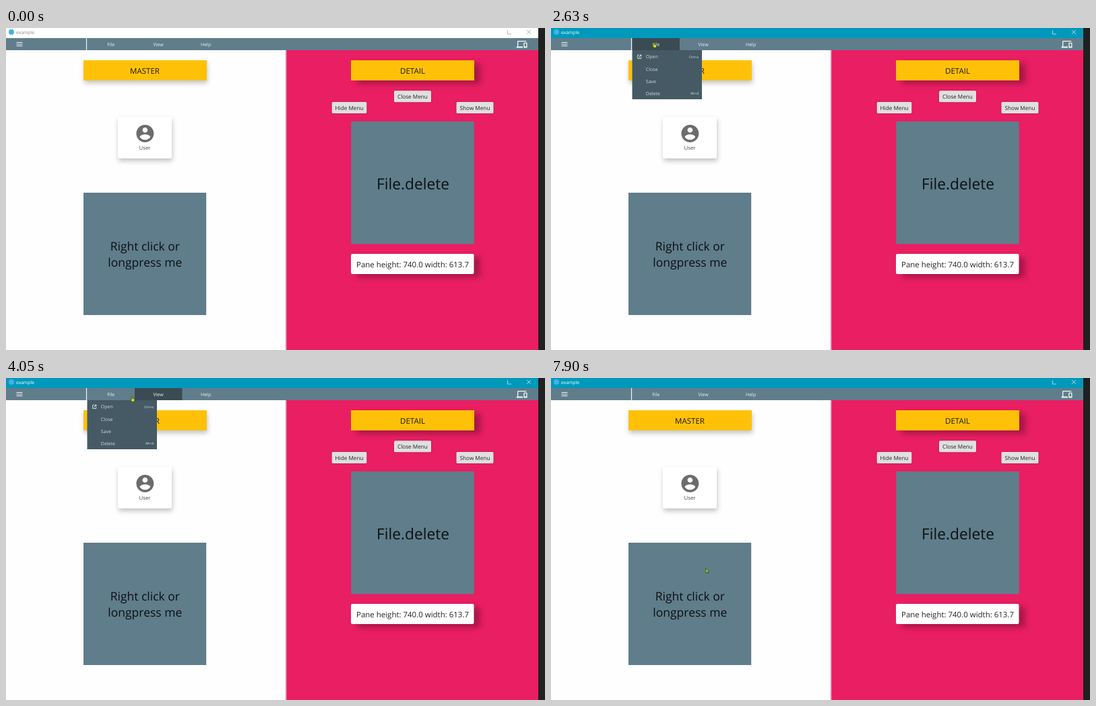
Animation, 800 px wide and 479 px high, one loop 8000 ms. Source, as an HTML page:

```html
<!DOCTYPE html>
<html lang="en">
<head>
<meta charset="utf-8">
<title>example</title>
<style>
  html, body { margin: 0; width: 100%; height: 100%; overflow: hidden; background: #fefefe; }
  svg { display: block; width: 800px; height: 479px; }
  text { font-family: "Open Sans", "Noto Sans", sans-serif; text-rendering: geometricPrecision; }
  .mid { text-anchor: middle; }
  .slate { fill: #607d8b; }
  .amber { fill: #ffc107; }
  .bar { fill: #eef2f3; font-size: 7px; }
  .item { fill: #d0d8dc; font-size: 7px; }
  .hint { fill: #e4e9eb; font-size: 5px; text-anchor: end; }
  .head { fill: #1b1708; font-size: 11.5px; }
  .btn rect { fill: #e0e0e0; }
  .btn text { fill: #222; font-size: 8.2px; }
  .big { fill: #0c1012; }
  .left { filter: drop-shadow(1px 4px 3.5px rgba(0, 0, 0, .23)); }
  .right { filter: drop-shadow(9px 5px 4px rgba(0, 0, 0, .28)); }
  .small { filter: drop-shadow(.5px .8px .8px rgba(0, 0, 0, .22)); }
</style>
</head>
<body>
<svg viewBox="0 0 800 479">
  <defs>
    <linearGradient id="edge">
      <stop offset="0" stop-color="#fefefe"/>
      <stop offset=".5" stop-color="#f3a5c0"/>
      <stop offset="1" stop-color="#e91e63"/>
    </linearGradient>
  </defs>

  <!-- panes -->
  <rect width="415" height="479" fill="#fefefe"/>
  <rect x="416" width="374" height="479" fill="#e91e63"/>
  <rect x="414" y="33" width="3" height="446" fill="url(#edge)"/>
  <rect x="790" width="10" height="479" fill="#202020"/>

  <!-- title bar -->
  <rect id="title" width="790" height="15"/>
  <circle cx="8" cy="6" r="4" fill="#45b0e6"/>
  <text id="name" x="15" y="8.8" font-size="6.8">example</text>
  <path id="controls" fill="none" stroke-width=".7" d="M744.5 3.5v5.5h5.5M773 3l6 6M779 3l-6 6"/>

  <!-- menu bar -->
  <rect class="slate" y="15" width="790" height="18"/>
  <path d="M15.5 21.5h9M15.5 24.1h9M15.5 26.7h9" stroke="#eef2f3"/>
  <rect id="tab" y="15" width="70.5" height="18" fill="#3b4b53"/>
  <path d="M119.5 15v18" stroke="#f4f6f7" stroke-width="1.2"/>
  <g class="bar mid">
    <text x="155.7" y="27">File</text>
    <text x="226" y="27">View</text>
    <text x="296.6" y="27">Help</text>
  </g>
  <path transform="translate(757.7 16.4) scale(.66)" fill="#f4f6f7" d="M4 6h18V4H4c-1.1 0-2 .9-2 2v11H0v3h14v-3H4V6zm19 2h-6c-.55 0-1 .45-1 1v10c0 .55.45 1 1 1h6c.55 0 1-.45 1-1V9c0-.55-.45-1-1-1zm-1 9h-4v-7h4v7z"/>

  <!-- left pane -->
  <rect class="amber left" x="115" y="48" width="183" height="30"/>
  <text class="head mid" x="206" y="67.7">MASTER</text>
  <rect class="left" x="166" y="132" width="80" height="62" rx="2" fill="#fff"/>
  <path transform="translate(190.8 141.4) scale(1.3)" fill="#6c6c6c" d="M12 2C6.48 2 2 6.48 2 12s4.48 10 10 10 10-4.48 10-10S17.52 2 12 2zm0 3c1.66 0 3 1.34 3 3s-1.34 3-3 3-3-1.34-3-3 1.34-3 3-3zm0 14.2c-2.5 0-4.71-1.28-6-3.22.03-1.99 4-3.08 6-3.08 1.99 0 5.97 1.09 6 3.08-1.29 1.94-3.5 3.22-6 3.22z"/>
  <text class="mid" x="206" y="181" font-size="7.8" fill="#444">User</text>
  <rect class="slate" x="115" y="245" width="182.2" height="182"/>
  <g class="big mid" font-size="17.5">
    <text x="206.3" y="331">Right click or</text>
    <text x="206.3" y="355.3">longpress me</text>
  </g>

  <!-- right pane -->
  <rect class="amber right" x="512" y="48" width="183" height="30"/>
  <text class="head mid" x="603.5" y="67.7">DETAIL</text>
  <g class="btn mid">
    <rect class="small" x="576" y="93.3" width="55" height="17" rx="1.5"/>
    <text x="603.4" y="104.7">Close Menu</text>
    <rect class="small" x="483.7" y="110" width="51.6" height="17" rx="1.5"/>
    <text x="509.5" y="121.5">Hide Menu</text>
    <rect class="small" x="668.5" y="110" width="55" height="17" rx="1.5"/>
    <text x="696" y="121.5">Show Menu</text>
  </g>
  <rect class="slate" x="512.3" y="139" width="182.4" height="182.4"/>
  <text class="big mid" x="604" y="240" font-size="22.7">File.delete</text>
  <rect class="right" x="512" y="336" width="182.5" height="30" rx="2" fill="#fff"/>
  <text class="mid" x="603.5" y="356.1" font-size="11.47" fill="#222">Pane height: 740.0 width: 613.7</text>

  <!-- drop-down menus -->
  <g id="file" transform="translate(120.5 33)">
    <rect width="103.5" height="73" fill="#455a64"/>
    <rect id="row" width="103.5" height="18.2" fill="#35454d"/>
    <path transform="translate(6.8 5.8) scale(.33)" fill="#fff" d="M19 19H5V5h7V3H5c-1.11 0-2 .9-2 2v14c0 1.1.89 2 2 2h14c1.1 0 2-.9 2-2v-7h-2v7zM14 3v2h3.59l-9.83 9.83 1.41 1.41L19 6.41V10h2V3h-7z"/>
    <text class="hint" x="98.5" y="11.6">Ctrl+o</text>
    <text class="hint" x="98.5" y="66.2">Alt+d</text>
  </g>
  <g id="help" transform="translate(261.5 33)">
    <rect width="103.5" height="91.5" fill="#455a64"/>
    <path d="M4.5 64.2h94" stroke="#a9b5ba"/>
  </g>

  <!-- pointer -->
  <circle id="ripple" cx="161" cy="96" r="5" fill="#b3a60c" opacity=".75"/>
  <g id="pointer" stroke="#26300c" stroke-width=".6" stroke-linejoin="round">
    <path id="arrow" fill="#9bdc12" d="M.4.3L5.8 4.9 3.6 5.1 4.9 7.3 3.8 7.8 2.6 5.6.8 7z"/>
    <path id="hand" fill="#d5e81c" d="M1.6.8q.8-.7 1.4.3l.5 2.4 2.3.6q.9.3.8 1.4l-.6 2.8H2.9L.4 5.4q.2-.9 1.2-.4l.6.4z"/>
  </g>
</svg>
<script>
const LOOP = 8000;
const BEGIN = 990;    // pointer appears
const TICK = 203.2;
const BAR = { x: 120.5, top: 15, bottom: 33, tab: 70.5 };
const ROW = 18.2;
const $ = id => document.getElementById(id);

function addItems(menu, labels) {
  labels.forEach((label, i) => {
    const el = document.createElementNS("http://www.w3.org/2000/svg", "text");
    el.setAttribute("class", "item");
    el.setAttribute("x", 20.3);
    el.setAttribute("y", 12.4 + i * ROW);
    el.textContent = label;
    menu.append(el);
  });
}
addItems($("file"), ["Open", "Close", "Save", "Delete"]);
addItems($("help"), ["Help", "About", "License", "", "Goodbye"]);

// Resting points of the pointer: time, x, y.
const stops = [
  [BEGIN, 594, 367], [1800, 149, 25], [2010, 147, 22], [2630, 150, 21],
  [3230, 282, 19], [3650, 281, 20], [4050, 184, 27], [5070, 159, 96],
  [6300, 160, 96], [7500, 230, 266], [7900, 229, 283]
];

function pointerAt(t) {
  const next = stops.findIndex(stop => stop[0] > t);
  if (next <= 0) return stops.at(next).slice(1);
  const [t0, x0, y0] = stops[next - 1];
  const [t1, x1, y1] = stops[next];
  const p = (t - t0) / (t1 - t0);
  const ease = p * p * (3 - 2 * p);
  return [x0 + (x1 - x0) * ease, y0 + (y1 - y0) * ease];
}

function menuAt(t) {
  if (t < 2210 || t >= 5270) return "";
  return t >= 3230 && t < 4050 ? "help" : "file";
}

const show = (id, on) => $(id).setAttribute("visibility", on ? "inherit" : "hidden");

function draw(t) {
  const focused = t >= 2210;
  $("title").setAttribute("fill", focused ? "#0099bc" : "#fff");
  $("name").setAttribute("fill", focused ? "#fff" : "#8a8a8a");
  $("controls").setAttribute("stroke", focused ? "#e6f4f8" : "#999");

  const menu = menuAt(t);
  for (const id of ["file", "help"]) {
    $(id).setAttribute("display", id === menu ? "inline" : "none");
  }

  const now = BEGIN + Math.floor((t - BEGIN) / TICK) * TICK;
  const [x, y] = pointerAt(now);
  show("pointer", t >= BEGIN);
  $("pointer").setAttribute("transform", `translate(${x} ${y})`);
  const hand = t >= 1790 && t < 6070;
  show("hand", hand);
  show("arrow", !hand);
  show("ripple", t >= 5070 && t < 5270);

  // Highlights trail the pointer by one refresh.
  const [hx, hy] = pointerAt(now - TICK);
  show("tab", hy > BAR.top && hy < BAR.bottom);
  $("tab").setAttribute("x", BAR.x + Math.floor((hx - BAR.x) / BAR.tab) * BAR.tab);
  const row = Math.floor((hy - BAR.bottom) / ROW);
  show("row", row >= 0);
  $("row").setAttribute("y", row * ROW);
}

const start = performance.now();
function tick() {
  draw((performance.now() - start) % LOOP);
  requestAnimationFrame(tick);
}
tick();
</script>
</body>
</html>
```
